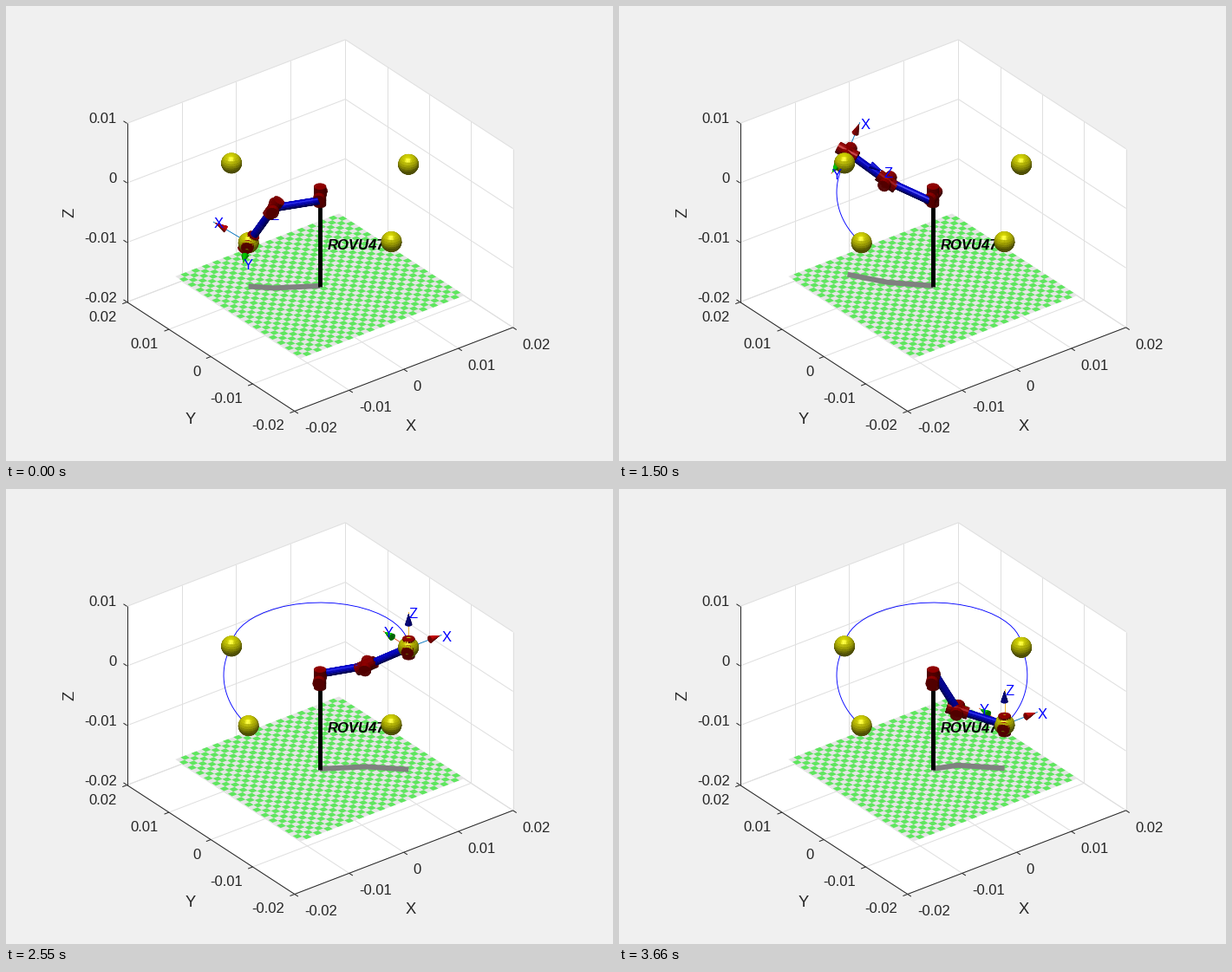
A matplotlib script for the animation above (3.69 s loop, 700 by 525 pixels).

```python
import numpy as np
import matplotlib.pyplot as plt
from matplotlib.animation import FuncAnimation
from matplotlib.collections import LineCollection, PolyCollection

W, H, DPI = 700, 525, 100
PX = 72 / DPI                      # points per pixel
STEPS, SEGMENTS = 41, 3

# Orthographic camera; one world unit is 0.01 on the axes.
SCALE, ORIGIN = 79.35, np.array([362.1, 218.8])
AZ, EL = np.radians(-37.5), np.radians(30)
RIGHT = np.array([np.cos(AZ), np.sin(AZ), 0])
VIEW = np.array([np.sin(AZ) * np.cos(EL), -np.cos(AZ) * np.cos(EL), np.sin(EL)])
UP = np.cross(VIEW, RIGHT)
ZHAT = np.array([0, 0, 1.0])
LIGHT = 0.35 * VIEW + 0.8 * ZHAT - 0.12 * RIGHT
LIGHT /= np.linalg.norm(LIGHT)

FLOOR = -1.515
UPPER, FORE, OFFSET = 0.68, 0.715, 0.15
JOINT_R, JOINT_LEN, TUBE_R, AXIS_LEN = 0.086, 0.31, 0.053, 0.6
RED, BLUE, GREEN, YELLOW = (1, 0, 0), (0, 0, 1), (0, 1, 0), (1, 1, 0)
MAROON = (0.7, 0, 0)


def project(p):
    p = np.asarray(p, float)
    return np.stack([ORIGIN[0] + SCALE * (p @ RIGHT),
                     ORIGIN[1] - SCALE * (p @ UP)], axis=-1)


# ---------- arm kinematics ----------
def reach(r, z, elbow):
    """Elevations of upper arm and forearm that put the wrist at (r, z)."""
    bend = elbow * np.arccos((r * r + z * z - UPPER**2 - FORE**2) / (2 * UPPER * FORE))
    lift = np.arctan2(z, r) - np.arctan2(FORE * np.sin(bend), UPPER + FORE * np.cos(bend))
    return lift, lift + bend


def pose(base, r, z, elbow, level):
    lift, fore = reach(r, z, elbow)
    wrist = (np.pi / 2 + fore, np.pi / 4) if level else (0, 0)
    return np.array([np.radians(base), lift, fore, *wrist])


LOW, HIGH = (1.028, -0.783), (1.277, 0.535)
POSES = [pose(135, *LOW, -1, False), pose(135, *HIGH, 1, False),
         pose(-45, *HIGH, 1, True), pose(-45, *LOW, 1, True)]


def joints_at(k):
    seg, i = divmod(k, STEPS)
    t = i / (STEPS - 1)
    s = t**3 * (10 - 15 * t + 6 * t * t)
    return POSES[seg] + s * (POSES[seg + 1] - POSES[seg])


def solve(q):
    base, lift, fore, bend, roll = q
    out = np.array([np.cos(base), np.sin(base), 0])
    side = np.array([-np.sin(base), np.cos(base), 0])

    def ray(a):
        return np.cos(a) * out + np.sin(a) * ZHAT

    shoulder = OFFSET * side
    elbow = shoulder + UPPER * ray(lift)
    wrist = elbow + FORE * ray(fore)
    normal = ray(fore + np.pi / 2)
    z = -np.cos(bend) * ray(fore) + np.sin(bend) * normal
    x = np.cos(bend) * normal + np.sin(bend) * ray(fore)
    axes = (np.cos(roll) * x + np.sin(roll) * side,
            np.cos(roll) * side - np.sin(roll) * x, z)
    return shoulder, elbow, wrist, side, ray(fore), axes


# ---------- shaded facets ----------
def tube(p0, p1, r0, r1, color, parts=4, n=18):
    """Quads, normals and colours of a capped tube or cone."""
    axis = (p1 - p0) / np.linalg.norm(p1 - p0)
    helper = ZHAT if abs(axis[2]) < 0.9 else np.array([1.0, 0, 0])
    u = np.cross(axis, helper)
    u /= np.linalg.norm(u)
    v = np.cross(axis, u)
    a = np.linspace(0, 2 * np.pi, n + 1)
    spoke = np.cos(a)[:, None] * u + np.sin(a)[:, None] * v
    f = np.linspace(0, 1, parts + 1)
    ring = ((p0 + f[:, None] * (p1 - p0))[:, None]
            + (r0 + f * (r1 - r0))[:, None, None] * spoke)
    side = np.stack([ring[:-1, :-1], ring[:-1, 1:], ring[1:, 1:], ring[1:, :-1]], 2)
    mid = spoke[:-1] + spoke[1:]
    mid /= np.linalg.norm(mid, axis=1)[:, None]
    quads, normals = [side.reshape(-1, 4, 3)], [np.tile(mid, (parts, 1))]
    for p, edge, r, sign in ((p0, ring[0], r0, -1), (p1, ring[-1], r1, 1)):
        if r > 0:
            hub = np.tile(p, (n, 1))
            quads.append(np.stack([hub, edge[:-1], edge[1:], edge[1:]], 1))
            normals.append(np.tile(sign * axis, (n, 1)))
    quads, normals = np.concatenate(quads), np.concatenate(normals)
    return quads, normals, np.tile(color, (len(quads), 1))


def ball(center, radius, color, rows=14, cols=28):
    lat = np.linspace(-np.pi / 2, np.pi / 2, rows + 1)[:, None]
    lon = np.linspace(0, 2 * np.pi, cols + 1)[None]
    p = np.stack([np.cos(lat) * np.cos(lon), np.cos(lat) * np.sin(lon),
                  np.sin(lat) + 0 * lon], -1)
    unit = np.stack([p[:-1, :-1], p[:-1, 1:], p[1:, 1:], p[1:, :-1]], 2).reshape(-1, 4, 3)
    normals = unit.mean(1)
    normals /= np.linalg.norm(normals, axis=1)[:, None]
    return center + radius * unit, normals, np.tile(color, (len(unit), 1))


def joint(p, axis):
    half = axis * JOINT_LEN / 2
    return tube(p - half, p + half, JOINT_R, JOINT_R, MAROON)


def shade(parts):
    """Visible facets, back to front, with their lit colours."""
    quads, normals, colors = (np.concatenate(x) for x in zip(*parts))
    seen = normals @ VIEW > 0
    quads, normals, colors = quads[seen], normals[seen], colors[seen]
    facing = normals @ LIGHT
    glint = 2 * facing * (normals @ VIEW) - LIGHT @ VIEW
    gloss = 0.36 * np.clip(glint, 0, 1) ** 10
    lit = colors * (0.3 + 0.52 * np.clip(facing, 0, 1))[:, None] + gloss[:, None]
    order = np.argsort(quads.mean(1) @ VIEW)
    return project(quads[order]), np.clip(lit[order], 0, 1)


# ---------- fixed scene ----------
fig = plt.figure(figsize=(W / DPI, H / DPI), dpi=DPI, facecolor="#f0f0f0")
ax = fig.add_axes([0, 0, 1, 1])
ax.set_xlim(0, W)
ax.set_ylim(H, 0)
ax.axis("off")

INK = "#262626"


def fill(points, color, z):
    ax.add_collection(PolyCollection(project(points), facecolors=color, lw=0, zorder=z))


def lines(segments, color, width, z):
    ax.add_collection(LineCollection(project(segments), colors=color,
                                     linewidths=width * PX, zorder=z))


def label(x, y, s, size=16.67, **kw):
    kw = {"color": INK, "family": "Liberation Sans", "va": "center_baseline", **kw}
    return ax.text(x, y, s, fontsize=size * PX, **kw)


fill([[(-2, 2, -2), (2, 2, -2), (2, 2, 1), (-2, 2, 1)],
      [(2, 2, -2), (2, -2, -2), (2, -2, 1), (2, 2, 1)],
      [(-2, -2, -2), (2, -2, -2), (2, 2, -2), (-2, 2, -2)]], "white", 0)

grid = []
for v in range(-2, 3):
    grid += [[(v, 2, -2), (v, 2, 1)], [(v, -2, -2), (v, 2, -2)],
             [(2, v, -2), (2, v, 1)], [(-2, v, -2), (2, v, -2)]]
for v in range(-2, 2):
    grid += [[(-2, 2, v), (2, 2, v)], [(2, -2, v), (2, 2, v)]]
lines(grid, "#dfdfdf", 1, 0.5)

TICK = 0.085
frame_lines = [[(-2, 2, -2), (-2, 2, 1)], [(-2, 2, -2), (-2, -2, -2)],
               [(-2, -2, -2), (2, -2, -2)]]
for v in range(-2, 3):
    frame_lines += [[(v, -2, -2), (v, -2 - TICK, -2)], [(-2, v, -2), (-2 - TICK, v, -2)]]
    if v < 2:
        frame_lines.append([(-2, 2, v), (-2, 2 + TICK, v)])
lines(frame_lines, INK, 1, 0.8)

for v in range(-2, 3):
    text = f"{v / 100:g}"
    x, y = project((v, -2, -2))
    label(x + 11, y + 19, text, ha="left")
    x, y = project((-2, v, -2))
    label(x - 12, y + 16, text, ha="right")
    if v < 2:
        x, y = project((-2, 2, v))
        label(x - 11.5, y - 6, text, ha="right")
label(467, 484, "X", 18.33, ha="center")
label(213, 476, "Y", 18.33, ha="center")
label(74, 238.5, "Z", 18.33, ha="center", va="center", rotation=90)

# Checkered floor
TILES = 31
edge = np.linspace(-1.5, 1.5, TILES + 1)


def tile(x0, x1, y0, y1):
    return [(x0, y0, FLOOR), (x1, y0, FLOOR), (x1, y1, FLOOR), (x0, y1, FLOOR)]


fill([tile(-1.5, 1.5, -1.5, 1.5)], "#e5e5e5", 1)
fill([tile(edge[i], edge[i + 1], edge[j], edge[j + 1])
      for i in range(TILES) for j in range(TILES) if (i + j) % 2], "#5fe65f", 1.1)

lines([[(0, 0, FLOOR - 0.02), (0, 0, 0)]], "black", 4.9, 2.5)
label(370.5, 275, "ROVU472", color="black", weight="bold", style="italic",
      ha="left", zorder=2.6)

# ---------- moving parts ----------
track = [solve(joints_at(k)) for k in range(STEPS * SEGMENTS)]
path = project([p[2] for p in track])
balls = [ball(solve(q)[2], 0.147, YELLOW) for q in POSES]

shadow, = ax.plot([], [], color="#808080", lw=6 * PX, solid_capstyle="butt", zorder=2)
trace, = ax.plot([], [], color="blue", lw=0.9 * PX, zorder=2.8)
spokes = [ax.plot([], [], color=c, lw=0.9 * PX, zorder=3)[0]
          for c in ("#0072bd", "#d95319", "#edb120")]
mesh = PolyCollection([], linewidths=0.4, zorder=5)
ax.add_collection(mesh)
names = [label(0, 0, s, color="blue", ha="left", zorder=6) for s in "XYZ"]


def update(k):
    shoulder, elbow, wrist, side, fore, axes = track[k]
    parts = balls + [
        joint(np.zeros(3), ZHAT), joint(np.zeros(3), side), joint(elbow, side),
        joint(elbow, fore), joint(wrist, side), joint(wrist, axes[2]),
        tube(shoulder, elbow, TUBE_R, TUBE_R, BLUE, 14),
        tube(elbow, wrist, TUBE_R, TUBE_R, BLUE, 14)]

    for axis, color, spoke, name in zip(axes, (RED, GREEN, BLUE), spokes, names):
        tip = wrist + AXIS_LEN * axis
        parts.append(tube(wrist + 0.39 * axis, wrist + 0.56 * axis, 0.05, 0, color, 3, 14))
        spoke.set_data(*project([wrist, tip]).T)
        x, y = project(tip)
        name.set_position((x + 0.5, y + 1))

    # The Z label stays behind the forearm while its tip is inside the tube.
    bend = joints_at(k)[3]
    names[2].set_zorder(6 if AXIS_LEN * np.sin(bend) > TUBE_R else 4)

    polys, colors = shade(parts)
    mesh.set_verts(polys)
    mesh.set_facecolor(colors)
    mesh.set_edgecolor(colors)

    ground = np.array([np.zeros(3), elbow, wrist])
    ground[:, 2] = FLOOR
    shadow.set_data(*project(ground).T)
    trace.set_data(*path[:k + 1].T)
    return [mesh, shadow, trace, *spokes, *names]


anim = FuncAnimation(fig, update, frames=STEPS * SEGMENTS, interval=30,
                     init_func=lambda: update(0), repeat=True, repeat_delay=0)
plt.show()
```
